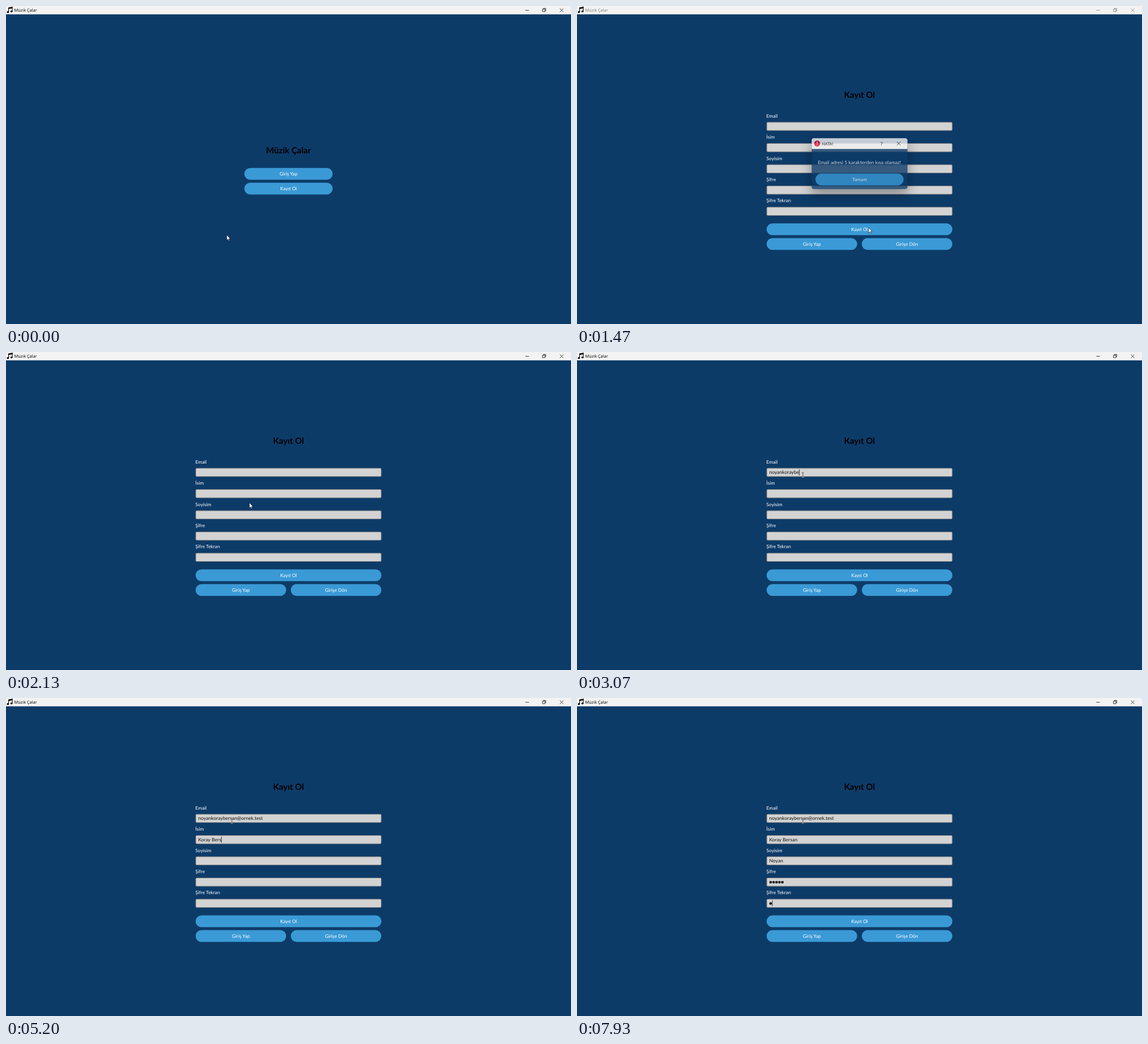
Recreate the animation shown at these times as an HTML page. Size 998 by 561 pixels, loop 8 s.

```html
<!DOCTYPE html>
<html lang="tr">
<head>
<meta charset="utf-8">
<title>Müzik Çalar</title>
<style>
  html, body { margin: 0; width: 100%; height: 100%; overflow: hidden; background: #0d3b68; }
  svg { display: block; width: 998px; height: 561px; }
  text { font-family: Lato, "Open Sans", sans-serif; font-size: 8.4px; text-rendering: geometricPrecision; white-space: pre; }
  .ui { font-family: "Open Sans", "Noto Sans", sans-serif; font-size: 7.4px; }
  .head { font-size: 15px; font-weight: bold; text-anchor: middle; }
  .label { fill: #fff; }
  .mid { fill: #fff; text-anchor: middle; }
  .msg { font-size: 8.6px; }
  .typed { font-size: 8.6px; fill: #111; }
  .button { fill: #3a9ad6; }
  .field { fill: #d3d3d3; stroke: #808080; }
  .line { fill: none; stroke: #111; stroke-width: .8; }
  #dialog { filter: drop-shadow(0 9px 11px rgba(0, 0, 0, .45)); }
  #beam { fill: none; stroke: #fff; stroke-width: .8; mix-blend-mode: difference; }
</style>
</head>
<body>
<svg viewBox="0 0 998 561">
  <rect width="998" height="561" fill="#0d3b68"/>
  <rect width="998" height="14.7" fill="#f3f3f3"/>
  <path d="M4.6 10.3V3.2L11 2V9.3" fill="none" stroke="#000" stroke-width="1.1"/>
  <path d="M4.2 3L11.5 1.6V4L4.2 5.3Z"/>
  <ellipse cx="3.3" cy="10.7" rx="1.9" ry="1.6"/>
  <ellipse cx="9.7" cy="9.6" rx="1.9" ry="1.6"/>
  <g id="chrome">
    <text class="ui" x="14.6" y="10.3">Müzik Çalar</text>
    <path class="line" d="M917.3 7.5H923.7M947.6 5.6H952V10H947.6ZM949.1 5.4V4.2H953.4V8.5H952.2M978.4 4.4L984.6 10.6M984.6 4.4L978.4 10.6"/>
  </g>

  <g id="home"><text class="head" x="499" y="259.5">Müzik Çalar</text></g>
  <g id="signup"><text class="head" x="499" y="161.7">Kayıt Ol</text></g>
  <rect id="caret" width=".8" height="11" fill="#111"/>

  <g id="dialog">
    <rect x="414.5" y="233.3" width="169.2" height="89.8" rx="4" fill="#0d3b68"/>
    <path d="M414.5 252.3V237.3Q414.5 233.3 418.5 233.3H579.7Q583.7 233.3 583.7 237.3V252.3Z" fill="#f3f3f3"/>
    <circle cx="424.2" cy="242.6" r="5.3" fill="#e8173f"/>
    <path d="M424.2 239.4V243.2M424.2 244.5V245.7" stroke="#fff" stroke-width="1.2"/>
    <text class="ui" x="432.6" y="245.5">HATA!</text>
    <text class="ui" x="536.3" y="245.6" style="font-size:8.4px">?</text>
    <path class="line" d="M565 239.4L571.4 245.8M571.4 239.4L565 245.8"/>
    <text class="mid msg" x="498.8" y="278.6">Email adresi 5 karakterden kısa olamaz!</text>
  </g>

  <path id="arrow" d="M0 0V9.2L2.1 7.3L3.4 10.3L4.8 9.7L3.5 6.8H6.2Z" fill="#fff" stroke="#111" stroke-width=".6"/>
  <path id="beam" d="M-1.7 -4H1.7M0 -4V4M-1.7 4H1.7"/>
</svg>
<script>
const LOOP = 8000, PAGE = 870, OPEN = 1400, CLOSE = 2000;
const LEFT = 334.9, TOP = 204.8, STEP = 37.45, WIDTH = 328.2, HEIGHT = 15.2;
const TEXT_X = 339.4, DOT = 5.2;
const $ = id => document.getElementById(id);

function add(parent, tag, attrs, text = '') {
  const el = document.createElementNS('http://www.w3.org/2000/svg', tag);
  for (const key in attrs) el.setAttribute(key, attrs[key]);
  el.textContent = text;
  return parent.appendChild(el);
}

function button(parent, x, y, width, text) {
  add(parent, 'rect', { class: 'button', x, y, width, height: 20.8, rx: 10.4 });
  add(parent, 'text', { class: 'mid', x: x + width / 2, y: y + 13.6 }, text);
}

button($('home'), 421, 285.8, 156, 'Giriş Yap');
button($('home'), 421, 311.8, 156, 'Kayıt Ol');
button($('signup'), LEFT, 383.5, WIDTH, 'Kayıt Ol');
button($('signup'), LEFT, 409.4, 160, 'Giriş Yap');
button($('signup'), 503, 409.4, 160, 'Girişe Dön');
button($('dialog'), 421, 295.6, 156, 'Tamam');

// keys: the moment each character appears
const email = 'noyankoraybersan@ornek.test';
const fields = [
  { label: 'Email', focus: 2600, value: email, keys: [...email].map((_, i) => 2670 + i * 35) },
  { label: 'İsim', focus: 3800, value: 'Koray Bersan',
    keys: [4000, 4130, 4260, 4330, 4400, 4600, 4730, 4930, 4930, 5200, 5270, 5330] },
  { label: 'Soyisim', focus: 5530, value: 'Noyan', keys: [5730, 5930, 6070, 6130, 6400] },
  { label: 'Şifre', focus: 6530, keys: [6730, 6870, 7000, 7200, 7470] },
  { label: 'Şifre Tekrarı', focus: 7730, keys: [7930] }
];
fields.forEach((f, i) => {
  const g = $('signup');
  f.y = TOP + i * STEP;
  add(g, 'text', { class: 'label', x: LEFT - .3, y: f.y - 8.2 }, f.label);
  add(g, 'rect', { class: 'field', x: LEFT + .3, y: f.y + .3, width: WIDTH - .6, height: HEIGHT - .6, rx: 1.8 });
  if (f.value) f.text = add(g, 'text', { class: 'typed', x: TEXT_X, y: f.y + 10.5 });
  else f.dots = f.keys.map((_, n) =>
    add(g, 'circle', { cx: TEXT_X + DOT * (n + .5), cy: f.y + 7.9, r: 2.2, fill: '#000' }));
});

// time, x, y of the pointer
const path = [
  [0, 390, 404], [70, 390, 404], [600, 549, 329], [870, 549, 329], [1300, 515, 391], [1470, 515, 391],
  [1730, 501, 317], [1900, 494, 308], [2000, 494, 308], [2130, 430, 266], [2500, 399, 217], [LOOP, 399, 217]
];

function pointerAt(t) {
  const i = path.findIndex(p => p[0] > t);
  const [t0, x0, y0] = path[i - 1], [t1, x1, y1] = path[i];
  const u = (t - t0) / (t1 - t0), k = u * u * (3 - 2 * u);
  return [x0 + (x1 - x0) * k, y0 + (y1 - y0) * k];
}

const show = (el, on) => el.style.display = on ? '' : 'none';

function draw(now) {
  const t = now % LOOP, late = t + 5;
  const signup = late >= PAGE, dialog = late >= OPEN && late < CLOSE;
  show($('home'), !signup);
  show($('signup'), signup);
  show($('dialog'), dialog);
  $('dialog').style.opacity = Math.min(1, Math.max(0, (t - OPEN + 40) / 140));
  $('chrome').style.opacity = dialog ? .5 : 1;

  let active;
  for (const f of fields) {
    const count = f.keys.filter(k => k <= late).length;
    if (f.text) f.text.textContent = f.value.slice(0, count);
    else f.dots.forEach((d, n) => show(d, n < count));
    f.end = f.text ? (count ? f.text.getComputedTextLength() : 0) : count * DOT;
    if (f.focus <= late) active = f;
  }
  show($('caret'), active);
  if (active) {
    $('caret').setAttribute('x', TEXT_X + active.end);
    $('caret').setAttribute('y', active.y + 2.1);
  }

  const [x, y] = pointerAt(t);
  const over = signup && !dialog && x > LEFT && x < LEFT + WIDTH &&
    fields.some(f => y > f.y && y < f.y + HEIGHT);
  show($('arrow'), !over);
  show($('beam'), over);
  $(over ? 'beam' : 'arrow').setAttribute('transform', `translate(${x} ${y})`);
  requestAnimationFrame(draw);
}
requestAnimationFrame(draw);
</script>
</body>
</html>
```
